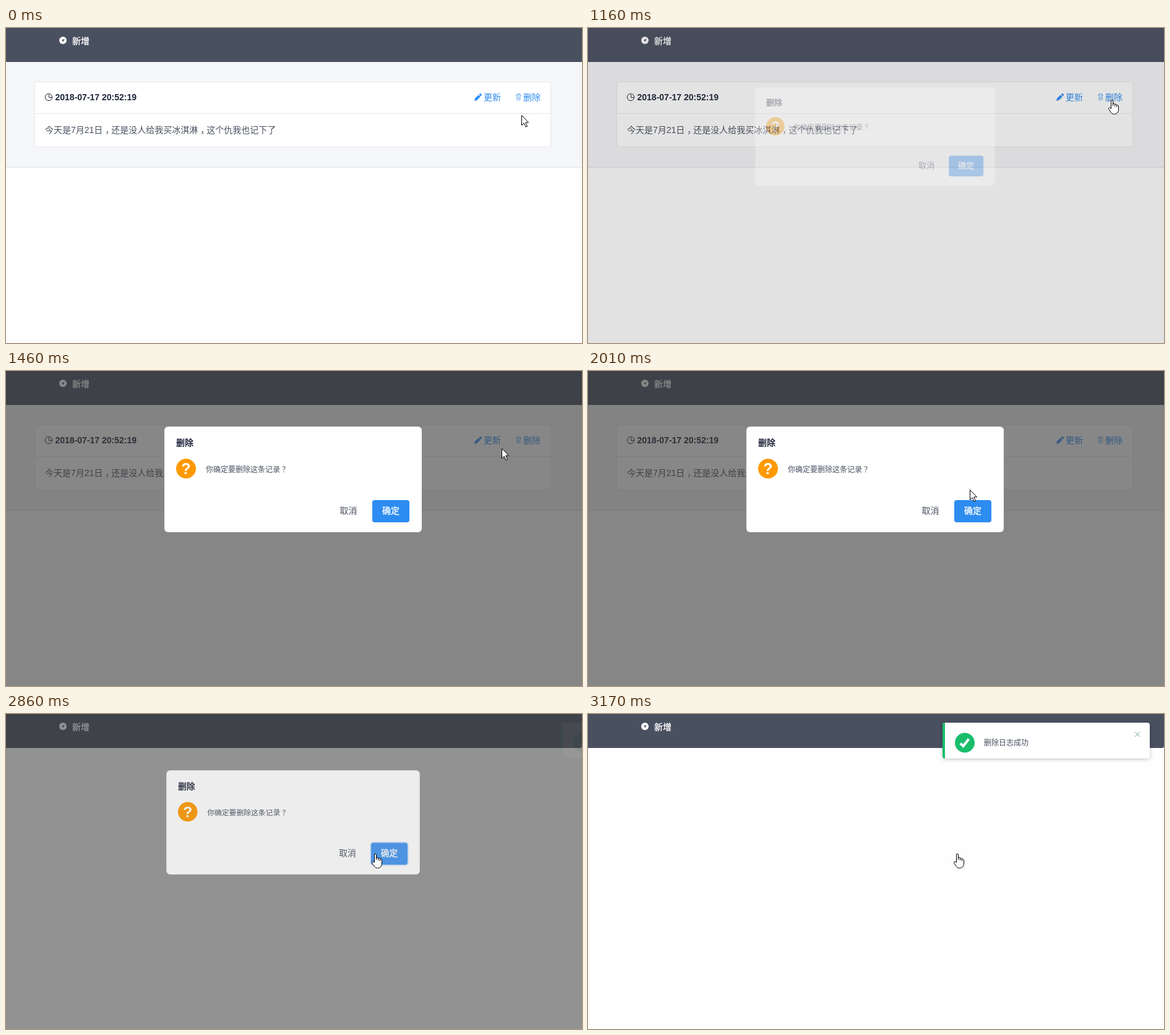
Recreate the animation shown at these times as an HTML page. Size 931 px wide and 510 px high, loop 4640 ms.

```html
<!DOCTYPE html>
<html lang="zh-CN">
<head>
<meta charset="utf-8">
<title>删除日志</title>
<style>
html, body { margin: 0; width: 100%; height: 100%; overflow: hidden; background: #fefefe; }
svg { display: block; font: 14px "Liberation Sans", "Noto Sans CJK SC", "Noto Sans CJK", sans-serif; fill: #495060; }
.bold { font-weight: bold; fill: #1c2438; }
.small { font-size: 12px; }
.white { fill: #fff; }
.strong { fill: #fff; stroke: #fff; stroke-width: .35; }
.blue { fill: #2d8cf0; }
.line { fill: none; }
#cursor path { fill: #fff; stroke: #000; stroke-linejoin: round; }
#notice > rect { filter: drop-shadow(0 1px 3px rgba(0, 0, 0, .25)); }
</style>
</head>
<body>
<svg width="931" height="510" viewBox="0 0 931 510">
  <g id="record">
    <rect y="50" width="931" height="5"/>
    <rect y="55" width="931" height="170" fill="#f5f6f8"/>
    <path d="M0 225.5H931" class="line" stroke="#dddee1"/>
    <rect x="46.5" y="87.5" width="834" height="105" rx="4" fill="#fff" stroke="#e6e8eb"/>
    <path d="M47 138.5H880" class="line" stroke="#e6e8eb"/>
    <g class="line" stroke="#1c2438">
      <circle cx="69" cy="112" r="5.6"/>
      <path d="M69.5 108V112.5H74"/>
    </g>
    <text x="79.5" y="117" class="bold">2018-07-17 20:52:19</text>
    <g class="blue">
      <path d="M757 118L758 114L763.8 108.2L766.8 111.2L761 117ZM764.6 107.4L766 106Q769 106 769 109L767.6 110.4Z"/>
      <text x="772" y="117">更新</text>
    </g>
    <g id="remove">
      <path d="M824 108.5H833M826.5 108V106.5H830.5V108M825.5 108.5L826 116.5H831L831.5 108.5M827.5 110.5V115M829.5 110.5V115" class="line" stroke="currentColor" stroke-width=".8" opacity=".8"/>
      <text x="836" y="117" fill="currentColor">删除</text>
    </g>
    <text x="63" y="170">今天是7月21日<tspan dx="4">，</tspan><tspan dx="-4">还是没人给我买冰淇淋</tspan><tspan dx="4">，</tspan><tspan dx="-4">这个仇我也记下了</tspan></text>
  </g>

  <path d="M0 0H931V52Q931 55 928 55H0Z"/>
  <circle cx="92" cy="20" r="6" class="white"/>
  <path d="M94.8 17.4L92.2 23L91.7 20.5L89 20Z"/>
  <text x="107" y="26" class="strong">新增</text>

  <rect id="mask" width="931" height="510" fill="#373737"/>

  <g id="dialog">
    <rect x="256" y="90" width="416" height="171" rx="6" class="white"/>
    <text x="275" y="121" class="bold">删除</text>
    <circle cx="291" cy="158" r="16" fill="#f90"/>
    <text x="291" y="167" class="white" font-size="25" font-weight="bold" text-anchor="middle">?</text>
    <text x="323" y="164" class="small">你确定要删除这条记录<tspan dx="3">？</tspan></text>
    <text x="539.5" y="231">取消</text>
    <rect id="ring" x="590" y="207" width="64" height="40" rx="6" fill="#2d8cf0" opacity=".2"/>
    <rect id="confirm" x="592" y="209" width="60" height="36" rx="4"/>
    <text x="608" y="231" class="strong">确定</text>
  </g>

  <g id="notice">
    <rect x="573" y="14" width="335" height="58" rx="4" class="white"/>
    <path d="M577 14V72Q573 72 573 68V18Q573 14 577 14Z" fill="#19be6b"/>
    <circle cx="609" cy="46.5" r="16" fill="#19be6b"/>
    <path d="M602 47.5L606.5 52L615.5 40.5" class="line" stroke="#fff" stroke-width="4"/>
    <text x="640" y="51" class="small">删除日志成功</text>
    <path d="M884 29L892 37M892 29L884 37" class="line" stroke="#7fa3a3"/>
  </g>

  <g id="cursor">
    <path id="arrow" d="M.5.5V16.5L4.2 13L7 19.3L9.5 18.2L6.7 12H11.5Z"/>
    <path id="hand" d="M4.5 14V2Q4.5.5 6 .5T7.5 2V10V7Q7.7 6 9 6.2T10.5 8V11V8Q11 7 12 7.2T13.5 9V12V9.5Q14 8.5 15.2 9T16.5 11V16Q16.5 19 15 21Q13 23.5 9.5 23.5T4.5 21L.8 15.5Q0 13.5 1.5 13T4.5 14.5Z"/>
  </g>
</svg>
<script>
const LOOP = 4640, TICK = LOOP / 60;
const CLICK_LINK = 14, CLICK_OK = 36, DELETED = 37;
const el = id => document.getElementById(id);
const set = (id, name, value) => el(id).setAttribute(name, value);
const show = (id, on) => set(id, 'visibility', on ? 'visible' : 'hidden');

// Progress from 0 to 1 between two ticks, plain and eased at both ends.
const ramp = (k, from, to) => Math.min(1, Math.max(0, (k - from) / (to - from)));
const ease = (k, from, to) => {
  const u = ramp(k, from, to);
  return u * u * (3 - 2 * u);
};

// The pointer goes to the link, sweeps to the dialog, then settles on its button.
function pointer(k) {
  const link = ramp(k, 4, 8), sweep = ramp(k, 18, 27), settle = ramp(k, 27, 31);
  const glide = 1 - (1 - sweep) ** 1.6;
  return [833 + 8 * link - 231 * glide - 19 * settle, 141 - 25 * link + 85 * sweep + 25 * settle];
}

function draw(t) {
  // Ticks begin on whole hundredths of a second.
  const k = Math.floor((Math.floor(t / 10) * 10 + 9.99) / TICK);
  const [x, y] = pointer(k).map(Math.round);
  const onLink = k >= 7 && k <= 18, onButton = k >= 28;

  set('cursor', 'transform', `translate(${x} ${y})`);
  show('hand', onLink || onButton);
  show('arrow', !onLink && !onButton);
  el('remove').style.color = onLink && k < CLICK_LINK ? '#57a3f3' : '#2d8cf0';
  show('record', k < DELETED);

  const fade = ease(k, 13.8, 17) - ease(k, CLICK_OK, 40);
  set('mask', 'opacity', .6 * (ease(k, 13.4, 18.6) - ease(k, CLICK_OK, 41)));
  set('dialog', 'opacity', fade);
  set('dialog', 'transform', `translate(464 175.5) scale(${.9 + .1 * fade}) translate(-464 -175.5)`);
  set('confirm', 'fill', k >= CLICK_OK ? '#4194f0' : onButton ? '#57a3f3' : '#2d8cf0');
  set('ring', 'opacity', k >= CLICK_OK ? .2 : 0);

  const entry = ease(k, 36.5, 41);
  set('notice', 'opacity', entry);
  set('notice', 'transform', `translate(${335 * (1 - entry)} 0)`);
}

const start = performance.now();
function loop() {
  draw((performance.now() - start) % LOOP);
  requestAnimationFrame(loop);
}
loop();
</script>
</body>
</html>
```
